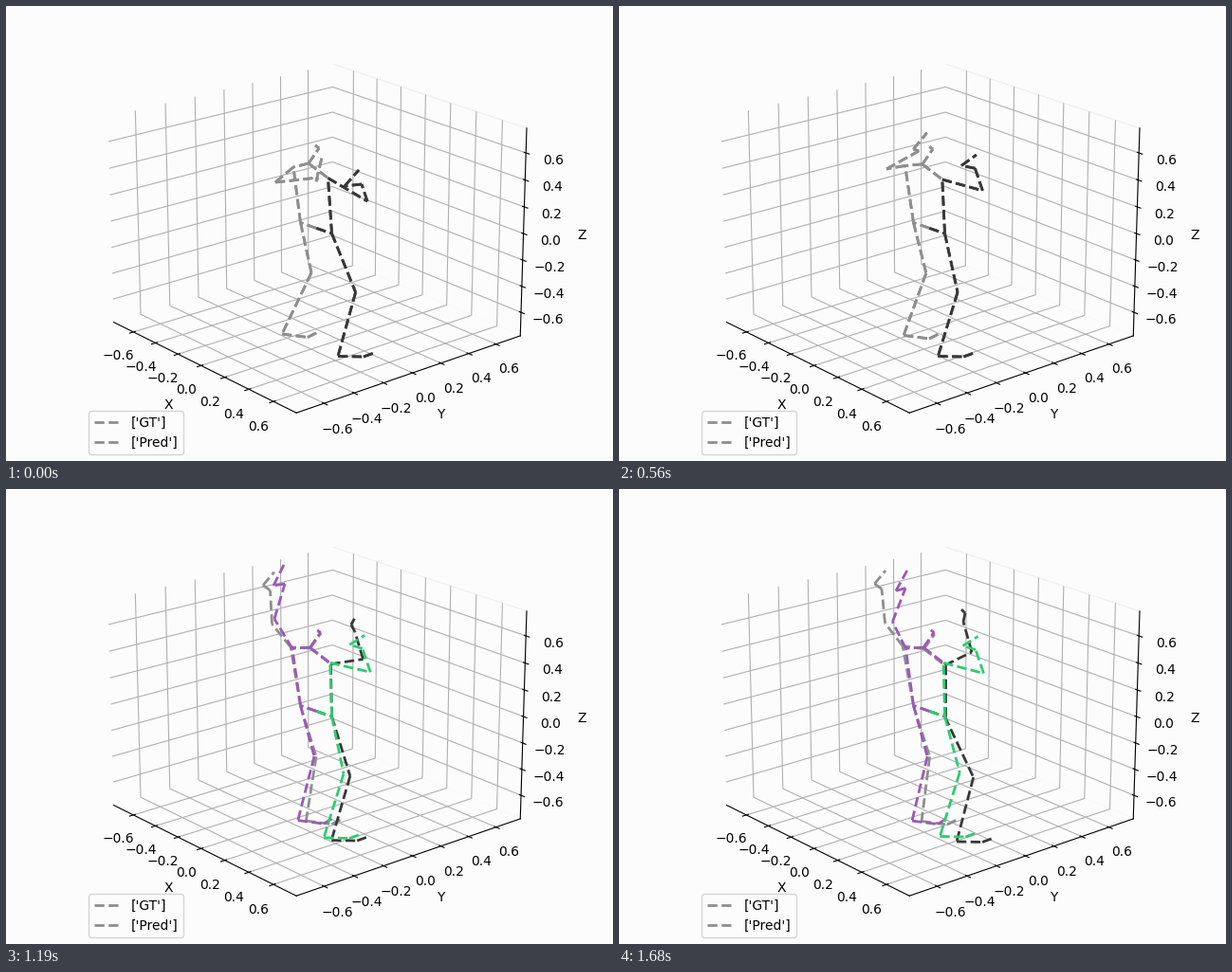
Write a matplotlib script that moves like this. It is 640x480 px and loops after 1.75 s.

```python
import numpy as np
import matplotlib.pyplot as plt
from matplotlib.animation import FuncAnimation
from matplotlib.lines import Line2D

W, H, DPI = 640, 480, 100
FRAMES, STEP = 25, 70
TURN, LAST = 10, FRAMES - 1        # forecast start, final frame
PAPER = "#fcfcfc"
GREYS = ("#8e8e8e", "#383838")     # left, right side of the body
COLOURS = ("#9b59b6", "#2ecc71")

LEG = ("knee", "ankle", "foot", "toe")
ARM = ("elbow", "wrist", "palm", "tip")
TRUNK = ("l_shoulder", "r_shoulder", "neck", "face", "crown")


def points(*xy):
    return np.array(xy, float)


# Stage positions, one row per joint.
HIPS = {"l_hip": points(310.5, 228.5), "root": points(327.3, 234.4),
        "r_hip": points(343.5, 240)}
TORSO = points((303, 170), (339.5, 181.5), (319, 166), (330, 150), (326, 147))
L_LEG = points((322, 281.5), (291, 346), (318, 349.5), (329, 344))
R_LEG = points((355, 302), (334, 369.5), (361, 370), (372, 366))

# Arm poses at the start, at the turn and at the end.
L_ARM = (points((284, 186), (329, 181), (327, 185), (333, 160)),
         points((281, 164), (309, 137), (301, 132), (320, 119)),
         points((280.5, 141.5), (277, 105.5), (269.5, 100), (281, 86)))
R_ARM = (points((381, 206), (375, 188), (357, 190), (372, 173)),
         points((384, 192), (375.5, 167), (362, 163), (378, 153)),
         points((372, 172), (363, 140), (365, 131), (361, 127)))
L_REACH = points((283, 137), (294, 100), (282, 102), (293, 80))

# Chains of joints, with the side that picks the colour (0 left, 1 right).
CHAINS = (
    (0, "l_hip l_knee l_ankle l_foot l_toe"),
    (1, "r_hip r_knee r_ankle r_foot r_toe"),
    (0, "root l_hip"),
    (1, "root r_hip"),
    (1, "r_hip r_shoulder r_elbow r_wrist r_palm r_tip"),
    (0, "l_hip l_shoulder l_elbow l_wrist l_palm l_tip"),
    (0, "neck l_shoulder"),
    (0, "neck r_shoulder"),
    (0, "neck face crown"),
)
BONES = [(side, a, b) for side, chain in CHAINS
         for a, b in zip(chain.split(), chain.split()[1:])]


def ramp(t, start, end):
    return min(max((t - start) / (end - start), 0), 1)


def smooth(u):
    return u * u * (3 - 2 * u)


def ease_out(u, power):
    return 1 - (1 - u) ** power


def through(poses, rise, settle):
    """Blend start -> turn -> end by two progress values."""
    start, turn, end = poses
    return start + (turn - start) * rise + (end - turn) * settle


def build_body(torso, l_arm, r_arm, l_leg, r_leg):
    body = dict(HIPS)
    body.update(zip(TRUNK, torso))
    for side, arm, leg in (("l_", l_arm, l_leg), ("r_", r_arm, r_leg)):
        body.update((side + name, p) for name, p in zip(ARM, arm))
        body.update((side + name, p) for name, p in zip(LEG, leg))
    return body


def true_parts(t):
    rise = ramp(t, 0, TURN)
    lean = np.outer([-1, 1, 0.6, 0.7, 1], [4, 4.5]) * t / LAST
    l_arm = through(L_ARM, rise ** 2, ease_out(ramp(t, TURN, 21), 3))
    r_arm = through(R_ARM, rise, smooth(ramp(t, TURN, 22)))
    stride = np.outer([0.2, 1, 1, 1], [28, 4.5]) * smooth(ramp(t, 0, 21))
    back = (1 - ramp(t, 0, 13)) ** 2
    ahead = smooth(ramp(t, 13, 22))
    swing = np.outer([0.85, 1, 1, 1], [16 * back + 22 * ahead, 2.5 * ahead])
    return TORSO + lean, l_arm, r_arm, L_LEG + stride, R_LEG + swing


def forecast_parts(t):
    """Carry on from the turn: the left arm reaches up, the rest drifts."""
    torso, l_arm, r_arm, l_leg, r_leg = true_parts(TURN)
    drift = ramp(t, TURN, LAST)
    reach = ease_out(ramp(t, TURN, 17), 2)
    sway = np.outer([0.6, 0.9, 1.1, 1.2], [9, 5]) * ramp(t, 17, LAST)
    settle = np.outer([0.1, 1, 1, 0.7], [5, 2]) * ease_out(drift, 2)
    slide = np.array([6 * drift ** 2 - 2.5 * drift, -3 * drift])
    return (torso + np.array([1, 0]) * drift,
            l_arm + (L_REACH - l_arm) * reach + sway,
            r_arm + np.array([0.5, 2.5]) * drift,
            l_leg + settle, r_leg + slide)


plt.rcParams["axes3d.automargin"] = True
fig = plt.figure(figsize=(W / DPI, H / DPI), dpi=DPI, facecolor=PAPER)

box = fig.add_axes([0, 0, 1, 1], projection="3d", elev=20, azim=-40)
box.set_facecolor("none")
box.set(xlabel="X", ylabel="Y", zlabel="Z",
        xlim=(-0.75, 0.75), ylim=(-0.75, 0.75), zlim=(-0.75, 0.75))
for axis in (box.xaxis, box.yaxis, box.zaxis):
    axis.pane.set(facecolor=PAPER, edgecolor=PAPER, alpha=1)
box.yaxis.pane.set_edgecolor("#f0f0f0")
handles = [Line2D([], [], color=GREYS[0], lw=2, ls="--", label=f"['{name}']")
           for name in ("GT", "Pred")]
box.legend(handles=handles, loc="lower left", facecolor=PAPER)

stage = fig.add_axes([0, 0, 1, 1])
stage.set(xlim=(0, W), ylim=(H, 0))
stage.axis("off")


def make_lines():
    return [stage.plot([], [], lw=2, ls="--", color=GREYS[side])[0]
            for side, _, _ in BONES]


true_lines = make_lines()
pred_lines = make_lines()


def pose(lines, body, colours):
    for line, (side, a, b) in zip(lines, BONES):
        line.set_data(*zip(body[a], body[b]))
        line.set_color(colours[side])


def update(frame):
    truth = build_body(*true_parts(frame))
    pose(true_lines, truth, GREYS)
    if frame < TURN:
        pose(pred_lines, truth, GREYS)
    else:
        pose(pred_lines, build_body(*forecast_parts(frame)), COLOURS)
    return true_lines + pred_lines


anim = FuncAnimation(fig, update, frames=FRAMES, interval=STEP,
                     repeat=True, repeat_delay=0, blit=False)
plt.show()
```
